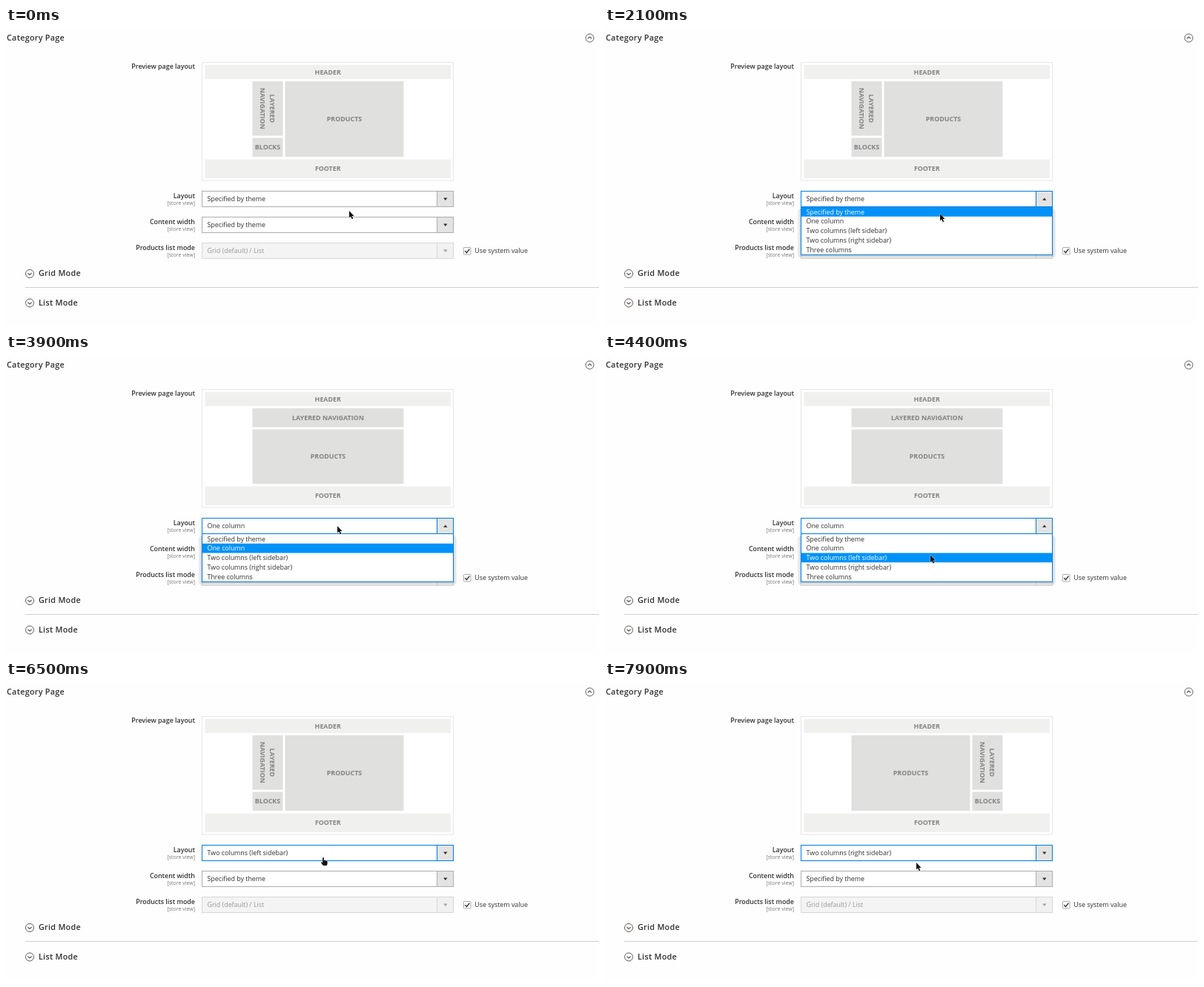
An HTML page for the animation above (8000 ms loop, 800 by 404 pixels).

```html
<!DOCTYPE html>
<html lang="en">
<head>
<meta charset="utf-8">
<title>Category page settings</title>
<style>
html, body { margin: 0; width: 100%; height: 100%; overflow: hidden; background: #fefefe; }
svg { display: block; width: 800px; height: 404px; }
text { font: 8.9px "Open Sans", sans-serif; fill: #303030; white-space: pre; }
.head { font-size: 10.8px; font-weight: 600; letter-spacing: .025em; }
.label { font-weight: 600; text-anchor: end; }
.scope { font-size: 7px; fill: #777; text-anchor: end; }
.block { font-weight: 700; fill: #828282; text-anchor: middle; }
</style>
</head>
<body>
<svg id="stage" viewBox="0 0 800 404" xmlns="http://www.w3.org/2000/svg"></svg>
<script>
const LOOP = 8000, STEP = 100;
const OPTIONS = ["Specified by theme", "One column", "Two columns (left sidebar)",
  "Two columns (right sidebar)", "Three columns"];
const ROW_TOP = 242, ROW = 12.75;
const BLUE = "#007bdb", GRAY = "#adadad";

// Pointer path: time, x, y
const PATH = [
  [0, 463, 247], [100, 463, 247], [700, 459, 232], [1800, 459, 232],
  [2100, 452, 251], [2200, 452, 251], [2400, 452, 262], [2600, 452, 262],
  [2700, 452, 256], [3000, 452, 256], [3500, 447, 231], [4000, 447, 231],
  [4500, 438, 275], [4700, 438, 275], [5100, 433, 286], [5600, 433, 286],
  [5900, 431, 274], [6200, 431, 274], [6500, 428, 237], [6800, 428, 237],
  [7100, 426, 272], [7400, 423, 286], [7700, 423, 286], [7900, 420, 244],
  [8000, 420, 244]
];
const OPEN = [[1400, 2700], [3600, 6100], [6700, 7700]];

const stage = document.getElementById("stage");

function add(parent, tag, attrs, content) {
  const el = document.createElementNS("http://www.w3.org/2000/svg", tag);
  for (const key in attrs) el.setAttribute(key, attrs[key]);
  if (content) el.textContent = content;
  parent.appendChild(el);
  return el;
}
const set = (el, attrs) => { for (const key in attrs) el.setAttribute(key, attrs[key]); };
const show = (el, on) => set(el, { visibility: on ? "visible" : "hidden" });
const rect = (p, x, y, width, height, fill, more) =>
  add(p, "rect", { x, y, width, height, fill, ...more });
const path = (p, d, more) => add(p, "path", { d, ...more });
const text = (p, x, y, content, cls = "") => add(p, "text", { x, y, class: cls }, content);

function chevron(x, y, up) {
  const g = add(stage, "g", {
    transform: `translate(${x} ${y}) scale(1 ${up ? -1 : 1})`,
    fill: "none", stroke: "#514943"
  });
  add(g, "circle", { r: 5.5, "stroke-width": .9 });
  path(g, "M-2.7-.9 0 1.5 2.7-.9", { "stroke-width": 1.1 });
}

function label(y, name) {
  text(stage, 255, y, name, "label");
  text(stage, 255, y + 9.2, "[store view]", "scope");
}

function select(y, value, off) {
  const g = add(stage, "g", {});
  const stroke = off ? "#d6d6d6" : GRAY;
  const box = rect(g, 264.5, y, 339, 21, off ? "#f4f4f4" : "#fff", { stroke });
  const button = rect(g, 581.5, y, 22, 21, off ? "#f1f1f1" : "#e3e3e3", { stroke });
  const arrow = path(g, "M-2.7-1.6H2.7L0 1.8Z", {
    fill: off ? "#a0a0a0" : "#303030", transform: `translate(592.8 ${y + 10.7})`
  });
  const line = text(g, 271.5, y + 13.9, value);
  if (off) line.style.fill = "#979797";
  return { box, button, arrow, line, y };
}

function block(p, x, y, w, h, name, fill = "#e0e0de") {
  rect(p, x, y, w, h, fill);
  if (name) text(p, x + w / 2, y + h / 2 + 3.2, name, "block");
}

function sidebar(p, x) {
  block(p, x, 72, 41, 73.5);
  [["LAYERED", 26.5], ["NAVIGATION", 14]].forEach(([word, dx]) =>
    add(p, "text", {
      class: "block", transform: `translate(${x + dx - 3.2} 108.8) rotate(90)`
    }, word));
  block(p, x, 148.5, 41, 25.5, "BLOCKS");
}

// Page
text(stage, 1, 16.8, "Category Page", "head");
chevron(787.5, 13.5, true);
text(stage, 255, 55.2, "Preview page layout", "label");

rect(stage, 264.5, 46.5, 339, 159.5, "#fff", { stroke: "#e6e6e6" });
block(stage, 268.5, 50, 331.5, 19, "HEADER", "#f0f0ef");
block(stage, 268.5, 177.5, 331.5, 25.5, "FOOTER", "#f0f0ef");

const oneColumn = add(stage, "g", {});
block(oneColumn, 332.5, 72, 204, 25.5, "LAYERED NAVIGATION");
block(oneColumn, 332.5, 100.5, 204, 73.5, "PRODUCTS");
const leftBar = add(stage, "g", {});
sidebar(leftBar, 332.5);
block(leftBar, 376.5, 72, 160, 102, "PRODUCTS");
const rightBar = add(stage, "g", {});
block(rightBar, 332.5, 72, 160, 102, "PRODUCTS");
sidebar(rightBar, 495.5);

label(230, "Layout");
label(265, "Content width");
label(300, "Products list mode");
const layout = select(220.5, OPTIONS[0]);
select(255.5, OPTIONS[0]);
select(290.5, "Grid (default) / List", true);

rect(stage, 617.5, 296.5, 9.5, 9.5, "#fff", { stroke: GRAY, rx: .6 });
path(stage, "M619.3 301.2l2.2 2.4 3.8-5", { fill: "none", stroke: "#303030", "stroke-width": 1.4 });
text(stage, 632.3, 304.4, "Use system value");

chevron(32, 332, false);
text(stage, 44, 335.2, "Grid Mode", "head");
rect(stage, 26, 350, 774, 1, "#cfcfcf");
chevron(32, 371.5, false);
text(stage, 44, 374.8, "List Mode", "head");

// Option list
const list = add(stage, "g", {});
for (let i = 5; i > 0; i--)
  rect(list, 264.5 - i, 244, 339 + 2 * i, 62.5 + i, "#000", { opacity: .035, rx: i });
rect(list, 264.5, 241.5, 339, 65, "#fff", { stroke: BLUE });
const bar = rect(list, 265, ROW_TOP, 338, ROW, "#0092f8");
const rows = OPTIONS.map((name, i) => text(list, 271.5, ROW_TOP + ROW * i + 9.5, name));

// Pointer
const pointer = add(stage, "g", {});
const look = { fill: "#111", stroke: "#fff", "stroke-width": .7, "paint-order": "stroke", "stroke-linejoin": "round" };
const arrowShape = path(pointer, "M0 0V9.6L2.1 7.6 3.7 11.2 5.3 10.5 3.7 7H6.6Z", look);
const handShape = path(pointer,
  "M-.9.6Q0-.5.9.6V4Q2 3.4 2.6 4.3 3.6 3.8 4.2 4.7 5.6 4.5 5.6 6V8.5L4.7 11H-.2L-3 7.3Q-3 5.9-1.8 6.4L-.9 7.2Z", look);

function pointerAt(t) {
  let i = 1;
  while (PATH[i][0] < t) i++;
  const [t0, x0, y0] = PATH[i - 1], [t1, x1, y1] = PATH[i];
  const k = (t - t0) / (t1 - t0), e = k * k * (3 - 2 * k);
  return [x0 + (x1 - x0) * e, y0 + (y1 - y0) * e];
}

function draw(time) {
  const t = Math.floor((time % LOOP) / STEP) * STEP;
  const [x, y] = pointerAt(t);
  const open = OPEN.some(([from, to]) => t >= from && t < to);
  const chosen = OPEN.filter(span => t >= span[1]).length;
  const over = Math.floor((y - ROW_TOP) / ROW);
  const lit = over >= 0 && over < OPTIONS.length ? over : chosen;

  show(oneColumn, chosen === 1);
  show(leftBar, chosen === 0 || chosen === 2);
  show(rightBar, chosen === 3);

  layout.line.textContent = OPTIONS[chosen];
  set(layout.box, { stroke: t >= OPEN[0][0] ? BLUE : GRAY });
  set(layout.button, { stroke: t >= OPEN[0][0] ? BLUE : GRAY });
  set(layout.arrow, { transform: `translate(592.8 ${layout.y + 10.7}) scale(1 ${open ? -1 : 1})` });

  show(list, open);
  set(bar, { y: ROW_TOP + ROW * lit });
  rows.forEach((row, i) => { row.style.fill = i === lit ? "#fff" : "#303030"; });

  const hand = !open && ((y > 221 && y < 242) || (y > 255 && y < 277));
  set(pointer, { transform: `translate(${x} ${y})` });
  show(arrowShape, !hand);
  show(handShape, hand);
}

const start = performance.now();
function tick() {
  draw(performance.now() - start);
  requestAnimationFrame(tick);
}
tick();
</script>
</body>
</html>
```
